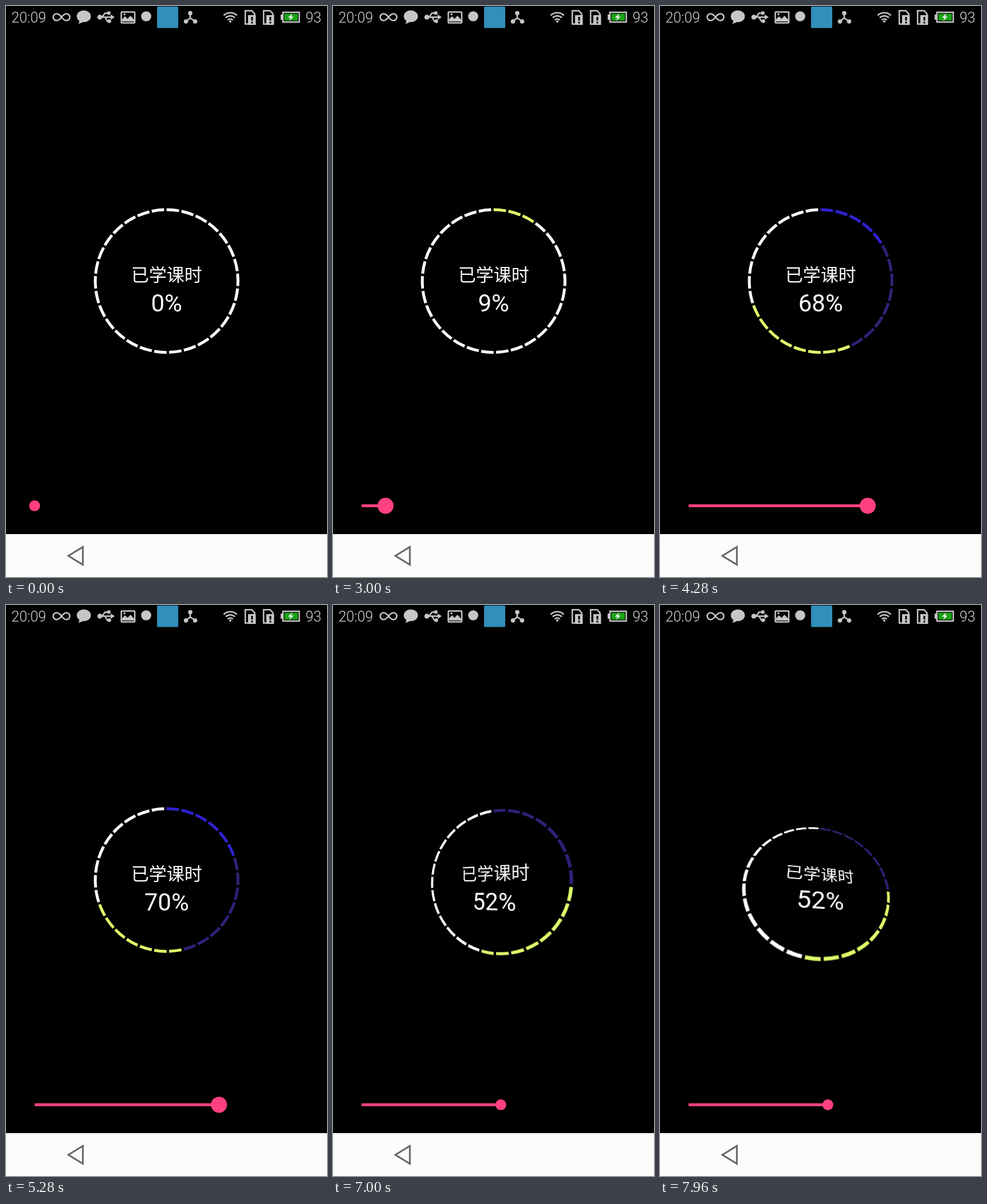
An HTML page for the animation above (8 s loop, 561x998 px).

```html
<!DOCTYPE html>
<html lang="zh">
<head>
<meta charset="utf-8">
<style>
  html, body { margin: 0; width: 100%; height: 100%; overflow: hidden; background: #000; }
  svg { position: absolute; left: 0; top: 0; }
  #dial { transform-origin: 280.7px 480.7px; }
  text { font-family: Roboto, "Noto Sans CJK SC", "Noto Sans CJK", sans-serif; }
  #dial text { fill: #fff; text-anchor: middle; }
  #caption { font-weight: 300; }
  .status { fill: #c6c6c6; stroke: none; }
  .status text { font-size: 25px; font-weight: 300; fill: #d6d6d6; }
  .line { fill: none; stroke: #c6c6c6; stroke-width: 2.5; }
</style>
</head>
<body>
<svg width="561" height="998" viewBox="0 0 561 998">
  <defs>
    <g id="sim">
      <path class="line" d="M6 24.5H1.2V1.2H12.5L17.5 6.5V10" />
      <path d="M6 9H19.5V26H6z" />
      <path d="M11.5 12h3v6.5h-3zm0 8.5h3v3h-3z" fill="#000" />
    </g>
  </defs>
  <g class="status">
    <text x="9.500" y="29">20:09</text>
    <text x="523.500" y="29">93</text>
    <!-- infinity, chat, usb -->
    <path class="line" d="M97 19.500c-4-5-6-6-8.500-6a6 6 0 0 0 0 12c2.500 0 4.500-1 8.500-6s6-6 8.500-6a6 6 0 0 1 0 12c-2.500 0-4.500-1-8.500-6z" />
    <ellipse cx="136" cy="18" rx="12.300" ry="10.300" />
    <path d="M128 23Q129 28 126 31Q132 30 136 27z" />
    <path class="line" d="M163 19.500H184M168 19.500L173 12.500H178M173 19.500L177 26.500H180" />
    <circle cx="164" cy="19.500" r="4.300" />
    <path d="M183 15L190 19.500L183 24zM177 9.500h5.500v5.500h-5.500z" />
    <circle cx="180.500" cy="26.500" r="3.200" />
    <!-- picture -->
    <rect class="line" x="201.500" y="10.500" width="23.500" height="19" rx="1" />
    <path d="M203 27V23L208 18L212.500 22.500L217.500 17L224 24V27z" />
    <circle cx="207" cy="14.500" r="1.800" />
    <!-- app marks -->
    <circle cx="245" cy="18" r="8.800" />
    <rect x="264" y="1" width="37" height="37.500" rx="1.500" fill="#318fba" />
    <!-- nodes, wifi -->
    <path class="line" d="M322 12V21L314 27M322 21L331 27" />
    <circle cx="322" cy="12.500" r="3.800" />
    <circle cx="314.500" cy="27" r="3.800" />
    <circle cx="330.500" cy="27" r="3.800" />
    <path class="line" d="M380.500 16.500A16.500 16.500 0 0 1 403.500 16.500M384 20.500A11.500 11.500 0 0 1 400 20.500M387.500 24.500A6.500 6.500 0 0 1 396.500 24.500" />
    <circle cx="392" cy="27" r="2" />
    <use href="#sim" x="417" y="7" />
    <use href="#sim" x="449" y="7" />
    <!-- battery -->
    <path d="M480 15h3v9h-3z" />
    <rect class="line" x="484" y="11" width="28.500" height="17" />
    <rect x="486.500" y="13.500" width="23.500" height="12" fill="#18a414" />
    <path d="M500 13L492.500 20.500H497L495 26L503 18.500H498.500z" fill="#eee" />
  </g>
  <path d="M0 923H561V998H0z" fill="#fcfcfb" />
  <path d="M109 961L134.300 945.500V976.500z" fill="none" stroke="#666" stroke-width="3" />
  <g fill="#ff4081">
    <rect id="track" x="50" y="871" height="5" />
    <circle id="knob" cy="873.500" />
  </g>
</svg>
<svg id="dial" width="561" height="998" viewBox="0 0 561 998">
  <g id="ring" fill="none" stroke-width="5"></g>
  <text id="caption" x="280.700" y="480.500" font-size="31">已学课时</text>
  <text id="percent" x="280.700" y="533.500" font-size="42"></text>
</svg>
<script>
const LOOP = 8000, STEP = 40, SEGMENTS = 30, BAND = 8, CENTER = 280.7, MIDDLE = 480.7, RADIUS = 124.7;
const PRESS = 2760, RELEASE = 5560;
const COLORS = ['#dfff6c', '#2f2278', '#2f22d0'];

// [time, progress in percent]
const PROGRESS = [[2760, 0], [2840, 1], [3000, 9.1], [3560, 62], [3840, 67.4], [4240, 67.4], [4280, 68.05],
  [4720, 84], [4900, 84], [4960, 85], [5280, 70.05], [5560, 52.9]];
// [time, rotateX, rotateY] in degrees
const TILT = [[6680, 0, 0], [6880, -2, -16.5], [7000, 4, -15.7], [7200, 28, -4], [7520, -20.3, 2.4],
  [7740, 2, 13], [7960, 29.3, 9.2]];

const $ = id => document.getElementById(id);

function sample(keys, t) {
  const next = keys.findIndex(key => key[0] > t);
  if (next === 0) return keys[0].slice(1);
  if (next < 0) return keys[keys.length - 1].slice(1);
  const a = keys[next - 1], b = keys[next], f = (t - a[0]) / (b[0] - a[0]);
  return a.slice(1).map((v, i) => v + (b[i + 1] - v) * f);
}

function pointAt(degrees) {
  const r = degrees * Math.PI / 180;
  return `${CENTER + RADIUS * Math.sin(r)} ${MIDDLE - RADIUS * Math.cos(r)}`;
}

const segments = Array.from({ length: SEGMENTS }, (_, i) => {
  const path = document.createElementNS('http://www.w3.org/2000/svg', 'path');
  const start = i * 360 / SEGMENTS;
  path.setAttribute('d', `M${pointAt(start)}A${RADIUS} ${RADIUS} 0 0 1 ${pointAt(start + 10)}`);
  return $('ring').appendChild(path);
});

function draw(t) {
  const [progress] = sample(PROGRESS, t);
  const percent = Math.floor(progress);
  const filled = percent * SEGMENTS / 100;
  segments.forEach((path, i) => {
    const band = Math.min(COLORS.length - 1, Math.floor((filled - i) / BAND));
    path.setAttribute('stroke', i < filled ? COLORS[band] : '#fff');
  });
  $('percent').textContent = percent + '%';

  const length = progress * 4.6;
  $('track').setAttribute('width', length);
  $('knob').setAttribute('cx', 50 + length);
  $('knob').setAttribute('r', t >= PRESS && t < RELEASE ? 14 : 9.5);

  const [x, y] = sample(TILT, t);
  $('dial').style.transform = x || y ? `perspective(288px) rotateX(${x}deg) rotateY(${y}deg)` : 'none';
}

const begin = performance.now();
function tick() {
  const t = (performance.now() - begin) % LOOP;
  draw(Math.floor(t / STEP) * STEP);
  requestAnimationFrame(tick);
}
tick();
</script>
</body>
</html>
```
